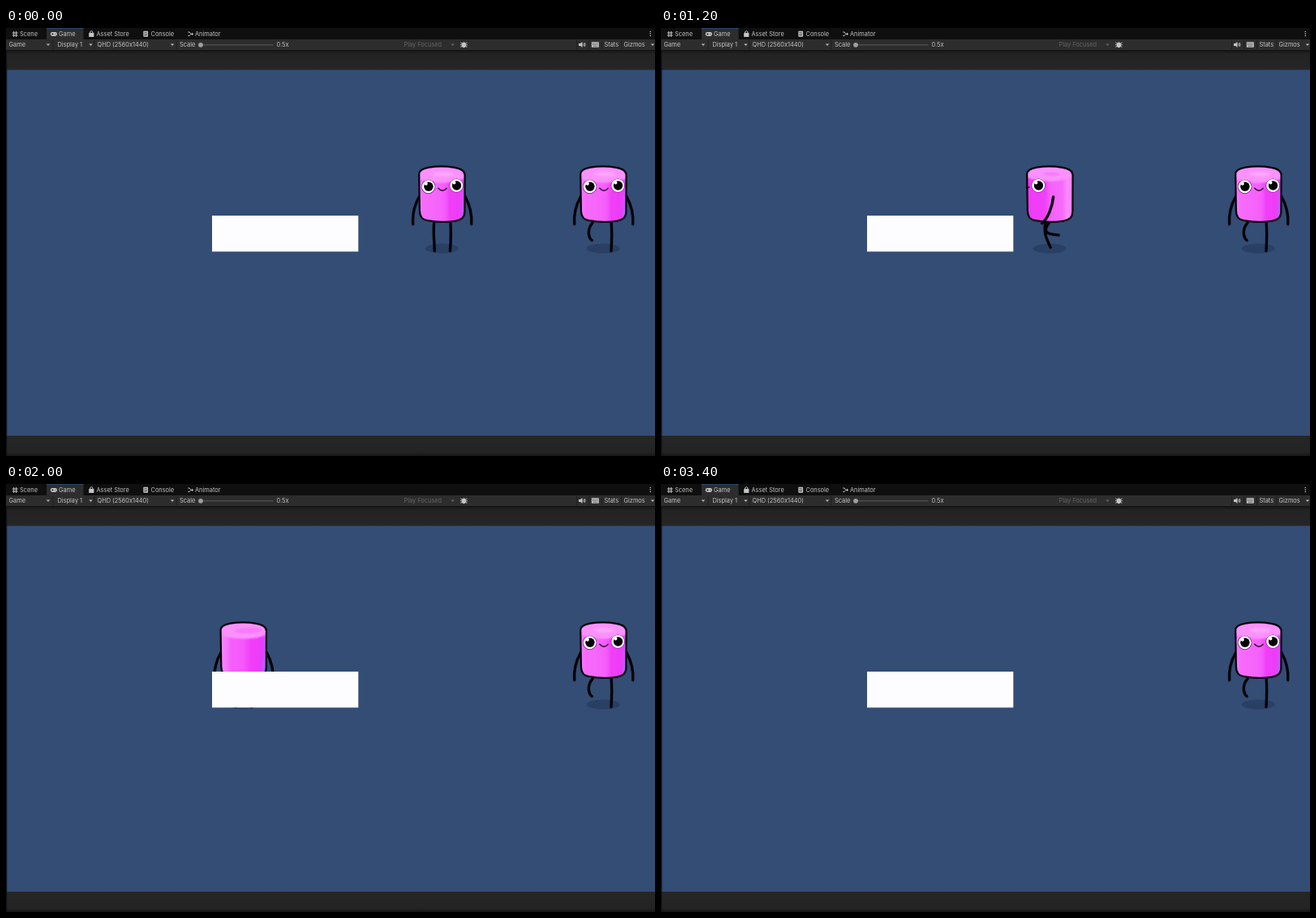
An HTML page that plays this animation: 800 px wide and 527 px high, repeating every 4000 ms.

```html
<!DOCTYPE html>
<html lang="en">
<head>
<meta charset="utf-8">
<title>Game view</title>
<style>
html, body { margin: 0; width: 100%; height: 100%; overflow: hidden; background: #262626; }
svg { display: block; width: 100%; height: 100%; }
text { font: 7.4px Inter, Roboto, sans-serif; fill: #c4c4c4; }
.dim { fill: #646464; }
.limb { fill: none; stroke: #050308; stroke-width: 3.4; stroke-linecap: round; stroke-linejoin: round; }
.outline { fill: none; stroke: #08020a; stroke-width: 2.2; stroke-linejoin: round; }
.icon { fill: none; stroke: #c4c4c4; stroke-width: 1; }
.arrow { fill: #b5b5b5; }
</style>
</head>
<body>
<svg viewBox="0 0 800 527" preserveAspectRatio="none">
<defs>
  <linearGradient id="edge" x2="0" y2="1">
    <stop offset="0" stop-color="#131313"/><stop offset=".2" stop-color="#232323"/><stop offset="1" stop-color="#262626"/>
  </linearGradient>
  <linearGradient id="foot" x2="0" y2="1">
    <stop offset="0" stop-color="#262626"/><stop offset=".8" stop-color="#242424"/><stop offset="1" stop-color="#171717"/>
  </linearGradient>
  <linearGradient id="frontFill">
    <stop offset="0" stop-color="#f985fc"/><stop offset=".12" stop-color="#f66cfb"/>
    <stop offset=".5" stop-color="#f562fb"/><stop offset=".58" stop-color="#f459fa"/>
    <stop offset=".66" stop-color="#f03df8"/><stop offset=".86" stop-color="#ef3bf8"/><stop offset="1" stop-color="#bb62fb"/>
  </linearGradient>
  <linearGradient id="sideFill">
    <stop offset="0" stop-color="#e838f2"/><stop offset=".12" stop-color="#f03df8"/>
    <stop offset=".4" stop-color="#f03ff8"/><stop offset=".52" stop-color="#f562fb"/>
    <stop offset=".76" stop-color="#f768fb"/><stop offset=".86" stop-color="#fa8dfc"/><stop offset="1" stop-color="#f97cfb"/>
  </linearGradient>
  <linearGradient id="backFill">
    <stop offset="0" stop-color="#f98cfc"/><stop offset=".16" stop-color="#f778fb"/>
    <stop offset=".24" stop-color="#f55efb"/><stop offset=".5" stop-color="#f558fb"/>
    <stop offset=".66" stop-color="#f03ef8"/><stop offset=".86" stop-color="#ed3bf8"/><stop offset="1" stop-color="#b45ffb"/>
  </linearGradient>
  <filter id="soft" x="-20%" y="-20%" width="140%" height="140%"><feGaussianBlur stdDeviation="1"/></filter>
  <path id="body" d="M-28 180C-28 176-24 173-16 171.6Q0 169 16 171.8C25 173.3 28.3 177 28.4 181L28.2 226C28 233 25 235.8 17 237.6Q0 240.5-17 237.2C-25 235.5-27 232-27.3 225Z"/>
  <clipPath id="inside"><use href="#body"/></clipPath>
  <path id="wall" d="M-30 184Q-20 191 0 190.5Q20 191 30 184V242H-30Z"/>
  <path id="mark" d="M-2.3-1H2.3L0 1.5Z"/>
  <ellipse id="shadow" cy="271.5" rx="20.5" ry="6" fill="#293f63"/>
  <g id="eye">
    <circle r="8.6" fill="#6c1772"/>
    <circle r="8" fill="#fff"/>
    <circle cx=".3" r="5.7" fill="#050308"/>
    <circle cx="-2.8" cy="-3.6" r="2" fill="#fff"/>
  </g>
  <g id="arms" class="limb">
    <path d="M-28 208C-33 217-36.5 229-35.5 241.5"/>
    <path d="M28.5 207C34 217 37.5 229 36.5 241.5"/>
  </g>
  <g id="front">
    <g clip-path="url(#inside)">
      <use href="#body" fill="#fb91fd"/>
      <ellipse cx="2" cy="180" rx="13" ry="3" fill="#fba5fd" filter="url(#soft)"/>
      <use href="#wall" fill="url(#frontFill)" filter="url(#soft)"/>
      <path d="M30 208Q23 217 24 236H30Z" fill="#ab6bfa" opacity=".6" filter="url(#soft)"/>
    </g>
    <use href="#body" class="outline"/>
    <use href="#eye" x="-16.6" y="195.3"/>
    <use href="#eye" x="18" y="194"/>
    <path d="M-4.4 197.3Q.8 203 5.8 197.4" fill="none" stroke="#24042a" stroke-width="1.5" stroke-linecap="round"/>
  </g>
</defs>

<rect width="800" height="527" fill="#262626"/>
<rect width="800" height="14" fill="#0f0f0f"/>
<rect x="50" width="45.5" height="14" fill="#2d2d2d"/>
<rect x="50" width="45.5" height="1" fill="#29466a"/>
<rect y="14" width="800" height="13" fill="#2d2d2d"/>
<rect y="27" width="800" height="25" fill="url(#edge)"/>
<rect y="502" width="800" height="25" fill="url(#foot)"/>
<rect y="51.5" width="800" height="450.5" fill="#334d75"/>
<g fill="#1f1f1f">
  <rect x="57.5" y="15" width="1" height="11"/><rect x="108.5" y="15" width="1" height="11"/>
  <rect x="209.5" y="15" width="1" height="11"/><rect x="703" y="15" width="1" height="11"/>
  <rect x="718" y="15" width="1" height="11"/><rect x="734" y="15" width="1" height="11"/>
  <rect x="758.5" y="15" width="1" height="11"/>
</g>

<text x="17" y="9.8">Scene</text>
<text x="65" y="9.8">Game</text>
<text x="111.5" y="9.8">Asset Store</text>
<text x="178.5" y="9.8">Console</text>
<text x="233" y="9.8">Animator</text>
<text x="3.5" y="23.2">Game</text>
<text x="63.5" y="23.2">Display 1</text>
<text x="112.5" y="23.2">QHD (2560x1440)</text>
<text x="214" y="23.2">Scale</text>
<text x="333.5" y="23.2">0.5x</text>
<text x="490.5" y="23.2" class="dim">Play Focused</text>
<text x="737.5" y="23.2">Stats</text>
<text x="761.5" y="23.2">Gizmos</text>
<g class="arrow">
  <use href="#mark" x="52" y="20.5"/><use href="#mark" x="104.5" y="20.5"/>
  <use href="#mark" x="205" y="20.5"/><use href="#mark" x="797" y="20.5"/>
  <use href="#mark" x="550.5" y="20.5" fill="#646464"/>
</g>
<path d="M240 20.8H329.5" stroke="#5b5b5b"/>
<circle cx="240" cy="20.8" r="2.9" fill="#a0a0a0"/>

<!-- tab and toolbar icons -->
<path class="icon" stroke-width=".8" d="M9.7 4V11M12.6 4V11M7.7 6H14.6M7.7 9H14.6"/>
<rect x="54.8" y="5" width="8.2" height="5" rx="2.4" fill="#c4c4c4"/>
<path d="M56.2 7.5H58.8M57.5 6.2V8.8M60.2 7.5H61.4" stroke="#2d2d2d" stroke-width=".8"/>
<path d="M102.2 6H108.4V11H102.2Z" fill="#c4c4c4"/>
<path class="icon" d="M103.7 6V4.6Q105.3 2.6 106.9 4.6V6"/>
<rect x="169.3" y="3.8" width="5.8" height="7" rx=".8" fill="#c4c4c4"/>
<path d="M170.3 6H174M170.3 8.5H174" stroke="#0f0f0f" stroke-width=".8"/>
<path class="icon" d="M224.3 5H226L228 7.4H230.5M224.3 9.6H226L228 7.4M229 6L230.6 7.4L229 8.8"/>
<g fill="#c4c4c4">
  <circle cx="794.3" cy="4.5" r=".8"/><circle cx="794.3" cy="7" r=".8"/><circle cx="794.3" cy="9.5" r=".8"/>
  <ellipse cx="564.4" cy="20.8" rx="2.6" ry="3.4"/>
  <path d="M706 19H708L710.5 17V24L708 22H706Z"/>
  <rect x="721.8" y="17.2" width="9" height="6.6" rx=".6"/>
</g>
<path class="icon" stroke-width=".8" d="M560.4 18L568.4 23.5M560.4 23.5L568.4 18M560 20.8H568.8M711.8 19Q713 20.5 711.8 22M713 18Q715 20.5 713 23"/>
<path d="M722.8 19H730M722.8 20.7H730M724 22.4H728.8" stroke="#2d2d2d" stroke-width=".7" stroke-dasharray="1.2 .6"/>

<g id="walker">
  <g id="facing">
    <use href="#shadow"/>
    <path class="limb" d="M-9.5 240C-11 252-9 262-9 274.5M10.7 240C11.5 252 11.3 262 10.2 274.5"/>
    <use href="#arms"/>
    <use href="#front"/>
  </g>
  <g id="side">
    <use href="#shadow"/>
    <path id="legs" class="limb"/>
    <g clip-path="url(#inside)">
      <use href="#body" fill="#fb91fd"/>
      <path d="M-30 183Q-20 188 0 189Q16 189 30 182V242H-30Z" fill="url(#sideFill)" filter="url(#soft)"/>
      <path d="M-10 180Q2 175.5 14 180Q5 183-10 180Z" fill="#f675f9" filter="url(#soft)"/>
    </g>
    <use href="#body" class="outline"/>
    <path d="M-28.5 196.8L-25.5 196" stroke="#08020a" stroke-width="1.8" stroke-linecap="round"/>
    <use href="#eye" x="-14" y="194"/>
    <path id="arm" class="limb" stroke-width="3"/>
  </g>
  <g id="back">
    <use href="#shadow"/>
    <path class="limb" d="M-9.8 240C-11.5 252-10 262-9.8 274.5M10.7 240C11.5 252 11.3 262 10.4 274.5"/>
    <use href="#arms"/>
    <g clip-path="url(#inside)">
      <use href="#body" fill="#fb91fd"/>
      <path d="M-12 181Q2 175 24 178Q20 185-2 184Z" fill="#f879fb" filter="url(#soft)"/>
      <use href="#wall" fill="url(#backFill)" filter="url(#soft)"/>
      <path d="M30 205Q21 216 22 234H30Z" fill="#ab6bfa" opacity=".6" filter="url(#soft)"/>
    </g>
    <use href="#body" class="outline"/>
  </g>
</g>

<g transform="translate(736.2)">
  <use href="#shadow"/>
  <path class="limb" d="M-13.2 240C-19 246-19.5 257-14 261.5M10 240C10.8 252 10.6 262 9.8 274.5"/>
  <use href="#arms"/>
  <use href="#front"/>
</g>

<rect x="254" y="231" width="180.3" height="44.3" fill="#fdfdff"/>
<rect y="27" width="1.2" height="500" fill="#10131a"/>
</svg>

<script>
const LOOP = 4000, STEP = 100, LAST = 3400, START_X = 537.2;
const get = id => document.getElementById(id);
const walker = get('walker'), arm = get('arm'), legs = get('legs');
const views = ['facing', 'side', 'back'].map(get);

// [time, square root of distance walked]: nearly constant acceleration
const pace = [[500, 0], [1200, 7.62], [1700, 12.41], [2300, 18.87], [2700, 23.09], [3400, 30.4]];

const strides = [
  { arm: 'M4.5 208C3 221-2 234-9.5 240.5',
    legs: 'M-5 239C-8 251-4 260 1 270M0 239C-8 249-7 254 11 255' },
  { arm: 'M5 208.5C11 217 13 227 5 231.5',
    legs: 'M-2 239C-4 252-9 262-12 270M2 239C6 250 10 258 12 269' }
];

function distance(t) {
  if (t <= pace[0][0]) return 0;
  const i = Math.max(1, pace.findIndex(p => p[0] >= t));
  const [t0, r0] = pace[i - 1], [t1, r1] = pace[i];
  return (r0 + (r1 - r0) * (t - t0) / (t1 - t0)) ** 2;
}

function draw(now) {
  const t = Math.min(Math.floor(now % LOOP / STEP) * STEP, LAST);
  walker.setAttribute('transform', `translate(${START_X - distance(t)})`);
  const view = t < 700 ? 0 : t < 2000 ? 1 : 2;
  views.forEach((v, i) => v.setAttribute('display', i === view ? 'inline' : 'none'));
  const stride = strides[Math.floor((t + STEP) / 200) % 2];
  arm.setAttribute('d', stride.arm);
  legs.setAttribute('d', stride.legs);
}

const begin = performance.now();
function tick() {
  draw(performance.now() - begin);
  requestAnimationFrame(tick);
}
tick();
</script>
</body>
</html>
```
